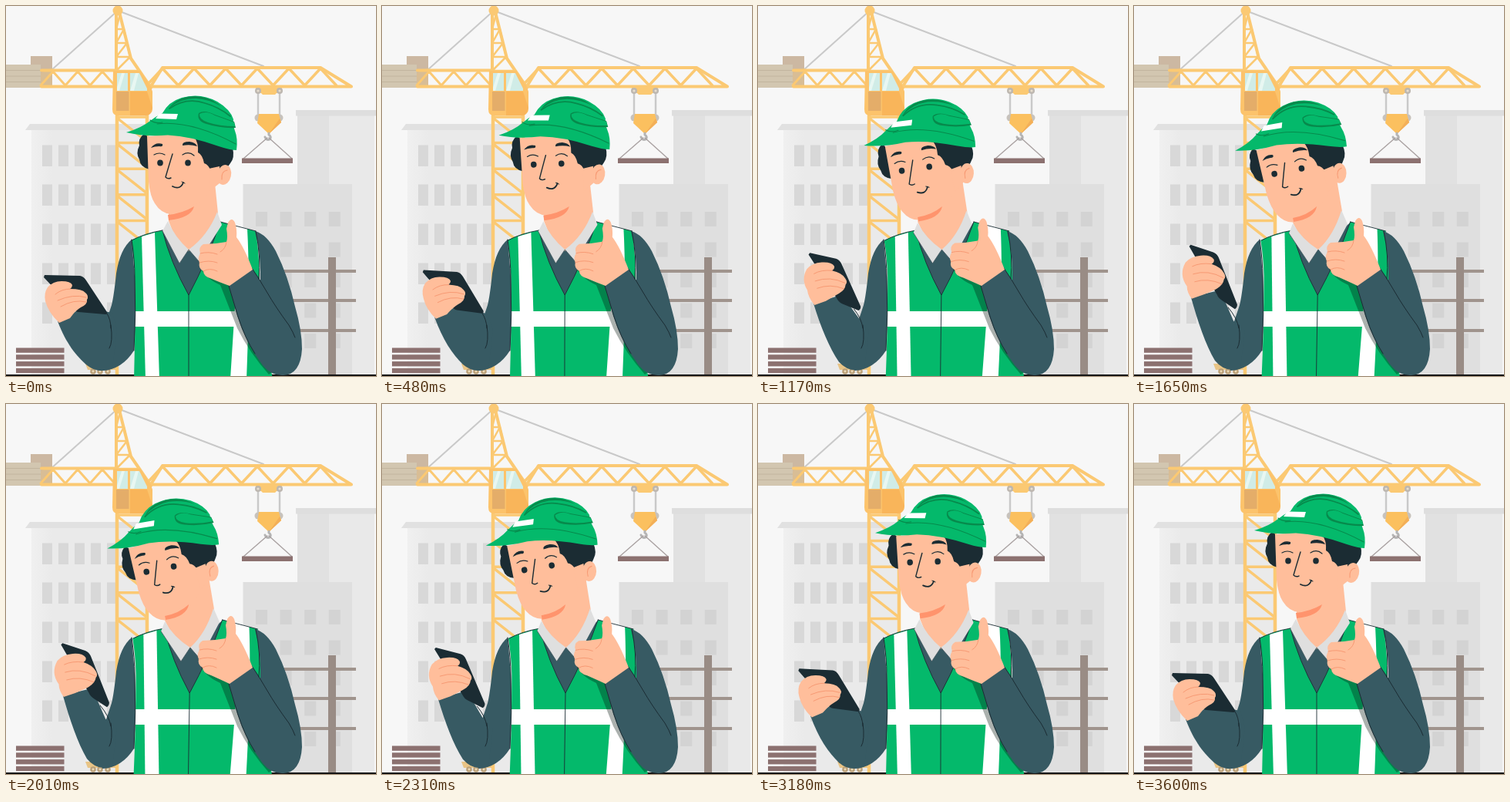
Animation of 480x480 px, one loop 3630 ms. Source, as an HTML page with a canvas:

```html
<!DOCTYPE html>
<html lang="en">
<head>
<meta charset="utf-8">
<title>Site engineer</title>
<style>
html, body { margin: 0; width: 100%; height: 100%; overflow: hidden; background: #f7f7f7; }
canvas { display: block; width: 480px; height: 480px; }
</style>
</head>
<body>
<canvas id="stage" width="480" height="480"></canvas>
<script>
const ctx = document.getElementById('stage').getContext('2d');
const LOOP = 3630;
const GREEN = '#04b96b', DEEP = '#078a4c', INK = '#1b2c33', SLEEVE = '#375a63';
const SKIN = '#ffbe9b', SKIN_LINE = '#f79a74', YELLOW = '#fbc973', STEEL = '#c9c9c9', BROWN = '#8c7170';

const fill = (color, path) => { ctx.fillStyle = color; ctx.fill(new Path2D(path)); };
const line = (color, width, path) => {
  ctx.strokeStyle = color;
  ctx.lineWidth = width;
  ctx.stroke(new Path2D(path));
};
const box = (color, x, y, w, h) => { ctx.fillStyle = color; ctx.fillRect(x, y, w, h); };
const dot = (color, x, y, rx, ry = rx, turn = 0) => {
  ctx.fillStyle = color;
  ctx.beginPath();
  ctx.ellipse(x, y, rx, ry, turn, 0, Math.PI * 2);
  ctx.fill();
};
// Blends two path strings that share the same commands.
const morph = (from, to, k) => {
  const ends = to.match(/-?[\d.]+/g);
  let i = 0;
  return from.replace(/-?[\d.]+/g, n => +n + (ends[i++] - n) * k);
};
const zigzag = (x0, x1, step, low, high) => {
  let path = `M${x0} ${low}`;
  for (let x = x0 + step, up = true; x <= x1; x += step, up = !up) path += `L${x} ${up ? high : low}`;
  return path;
};

function buildings() {
  box('#f7f7f7', 0, 0, 480, 480);
  const shade = ctx.createLinearGradient(32, 0, 60, 0);
  shade.addColorStop(0, '#f0f0f0');
  shade.addColorStop(1, '#eaeaea');
  ctx.fillStyle = shade;
  ctx.fillRect(33, 160, 150, 319);
  fill('#e1e1e1', 'M25 161L31 153H185V161Z');
  for (let r = 0; r < 5; r++)
    for (let c = 0; c < 5; c++) box('#d8d8d8', 47 + c * 21, 180.5 + r * 51, 13, 27.5);

  box('#e9e9e9', 378, 142, 100, 337);
  box('#e1e1e1', 378, 142, 41, 100);
  box('#dedede', 376, 135, 104, 7.5);
  box('#dfdfdf', 307.5, 231, 141.5, 248);
  for (let r = 0; r < 5; r++)
    for (let c = 0; c < 4; c++) box('#d3d3d3', 324 + c * 31.6, 267 + r * 39.5, 15, 19);

  for (const y of [342, 380, 419]) box('#a0948d', 340, y, 114, 4);
  box('#998c85', 418, 326, 10, 153);
  for (let i = 0; i < 4; i++) box(BROWN, 13, 443.5 + i * 8.8, 62.5, 6.3);
}

function crane() {
  line(STEEL, 2, 'M145 6L58 84M145 6L334 78');
  box('#ccb8a2', 32, 65, 28, 31);
  box('#d2c6b0', 0, 76, 45, 30);
  line('#c2b59e', 1, 'M0 83.5H45M0 91H45M0 98.5H45');
  fill('#d8bd95', 'M45 87L60 80V104H45Z');

  line(YELLOW, 4, 'M46 83.5H142M46 104.5H142');
  line(YELLOW, 3, zigzag(45, 142, 16, 103, 85));
  line(YELLOW, 4, 'M187 104.5H448L408 80H203L188 104');
  line(YELLOW, 3.5, zigzag(182.5, 430, 20.5, 103, 81));

  line(YELLOW, 4.5, 'M144 142V479M183 140V479');
  for (let y = 144; y < 310; y += 33.6) line(YELLOW, 3.5, `M144 ${y}H183M145 ${y + 2}L183 ${y + 32}`);
  line(YELLOW, 4, 'M143 8V88M147 8L154 36L162 68L188 106');
  line(YELLOW, 2.5, 'M143 30H153L143 48H157L143 66H161L143 84H172M147 14L143 30M153 30L157 48L161 66');
  dot(YELLOW, 145, 6, 6.5);

  fill('#fcc36b', 'M139 84H174L188 105L190 111V133Q190 141 181 142H145Q138 142 138 134Z');
  fill('#d0ece7', 'M144 87H158V110H144ZM161 87H173L183 107V110H161Z');
  fill('#e8f7f2', 'M150 87H154L147 110H144V106ZM168 87H172L166 110H161Z');
  box('#e4ad69', 143, 111, 16.5, 25);
  fill('#f9b55a', 'M161 111H183L190 132Q189 142 181 142H161Z');

  line(STEEL, 2.5, 'M327 112V143M355 112V143');
  fill(YELLOW, 'M324 106H358V113H351L349 115H333L331 113H324Z');
  for (const x of [327, 355]) {
    dot('#bdb7b0', x, 110, 4);
    dot('#e9dfcf', x, 110, 1.6);
    dot('#c7c2bc', x, 145, 4.5);
  }
  fill('#fbc05f', 'M328 140H354L357 151L341 166L326 152Z');
  fill('#f3af58', 'M341 166L357 151L355 146Z');
  line('#b4b4b4', 3, 'M341 165V167Q345 170 342 173Q338 175 336 170');
  line('#aaa2a2', 1.4, 'M339 171L308 198M341 171L371 198');
  box(BROWN, 306, 197.5, 66, 6.5);

  fill('#e8c486', 'M103 464H142V472H106Z');
  for (const x of [113, 122, 132]) {
    dot('#bca179', x, 474, 3.8);
    dot('#eddbb8', x, 474, 1.4);
  }
  box('#161616', 0, 478, 480, 2);
}

function neck(k) {
  fill(SKIN, morph('M211 255L211 279L220 302L237 318L262 300L275 269L270 220Z',
    'M206 258L206 281L217 302L237 318L260 298L270 267L262 220Z', k));
}

function chinShadow(k) {
  fill('#ff946d', morph('M210 271Q229 269 244 260Q240 275 211 278Z', 'M206 275Q224 272 237 260Q234 276 207 280Z', k));
}

function collar(k) {
  fill('#dfdfdf', morph('M210 279L203 292L225 334L237 316Q219 300 210 279Z',
    'M206 282L201 295L227 334L239 316Q217 302 206 282Z', k));
  fill('#dfdfdf', morph('M274 267L280 284L250 331L237 316Q262 298 274 267Z',
    'M269 265L277 283L252 331L239 316Q259 298 269 265Z', k));
  line('#42565d', .8, morph('M203 292L225 334L237 316L250 331', 'M201 295L227 334L239 316L252 331', k));
}

function torso(k) {
  const lean = k * .016;
  ctx.save();
  ctx.transform(1, 0, -lean, 1, lean * 450, 0);
  fill(SLEEVE, 'M203 291L237 316L279 280L285 350L237 380L205 320Z');
  fill(GREEN, 'M162 304Q180 295 203 291Q213 332 237 375Q262 328 278 280L324 292Q330 330 329 390L346 484H166Q168 420 167 350Q166 325 162 304Z');
  fill('#fff', 'M176 299L193 294L199 484H181Z');
  fill('#fff', 'M167 396H308V416H167Z');
  fill('#fff', 'M294 283L313 289Q317 360 312 484H291L297 390Z');
  line(INK, .9, 'M203 291Q213 332 237 375Q262 328 278 280M237 375V484M163 304Q180 295 203 291M278 280L324 292');
  ctx.restore();
}

function phoneArm(k) {
  fill(SLEEVE, 'M163 303Q148 315 143 347Q140 376 137 388L129 412L116 440L125 473Q150 472 166 447Q169 400 167 350Z');
  fill(SLEEVE, morph('M67 409C78 438 91 454 105 466Q120 478 138 470L144 420L138 398L100 391Z',
    'M74 377C83 409 93 439 105 460Q119 477 138 470L144 420L129 409L112 368Z', k));
  line(INK, 1, 'M163 303Q167 330 167 352Q169 400 166 447M136 414Q139 436 134 444');
  line(INK, 1, morph('M131 399Q136 407 136 418', 'M122 391Q134 405 136 418', k));
  fill(INK, morph('M50 349L96 350Q101 351 104 356L131 397Q132 400 129 400L94 397Q90 397 86 391L49 352Z',
    'M74 309L103 319Q108 321 110 326L134 387Q134 391 131 393L115 382Q110 379 108 374L72 311Z', k));
  fill(SKIN, morph(
    'M54 365Q61 357 72 357Q84 357 86 362Q86 365 83 367Q99 367 103 372Q108 376 105 381Q106 387 97 391Q90 395 83 405L69 411Q55 398 51 383Q49 372 54 365Z',
    'M67 332Q74 324 87 323Q100 322 104 328Q105 332 101 334Q113 338 117 346Q120 351 117 354Q116 361 108 366Q103 369 90 374L75 379Q69 371 69 363Q58 348 67 332Z', k));
  line(SKIN_LINE, 1, morph('M84 367Q72 367 64 374M104 378Q87 373 67 382M104 384Q88 380 71 390',
    'M101 334Q86 332 76 337M116 352Q96 341 77 347M114 360Q96 352 79 357', k));
}

function thumbArm(k) {
  fill('rgba(0,20,10,.33)', 'M251 336Q256 352 278 362L300 418Q316 450 341 478L352 470L296 352Z');
  fill(SLEEVE, 'M323 292Q338 296 350 318Q366 350 375 390Q384 421 384 445Q382 478 360 479Q344 480 333 466Q311 437 300 402L289 363L319 340L330 356Q331 320 323 292Z');
  line(INK, 1, 'M324 292Q331 325 328 354M319 340Q328 353 339 372Q350 391 367 414Q373 424 375 430M289 363L301 403Q310 431 323 451');
  ctx.save();
  ctx.translate(-k, -2 * k);
  fill(SKIN, `M288 281Q293 273 297 281Q300 290 299 300Q309 313 ${320 + k} ${342 + 2 * k}L${290 + k} ${363 + 2 * k}Q276 358 267 354Q256 351 256 344Q249 340 251 333Q248 327 252 321Q249 313 256 309Q271 309 286 306Q288 300 286 289Z`);
  line(SKIN_LINE, 1, 'M252 321Q263 318 274 322M251 333Q263 329 274 333M256 344Q264 339 274 344M286 306Q285 315 278 319');
  ctx.restore();
}

function head(k) {
  ctx.save();
  ctx.translate(272 - 2 * k, 292 - 1.5 * k);
  ctx.rotate(-.201 * k);
  ctx.translate(-272, -292);

  fill(INK, 'M179 166Q171 172 173 181Q168 191 173 199Q174 209 186 212L200 180Z');
  fill(SKIN, 'M183 169L185 228Q187 247 193 256Q201 269 214 270Q242 265 260 246L276 229L280 180L250 164Z');
  fill(INK, 'M244 170Q250 177 249 190Q255 193 257 204Q263 206 265 213Q284 217 291 204Q297 197 294 184L270 170Z');
  dot(SKIN, 283, 219, 9, 13, .2);
  fill(SKIN, 'M263 211L277 208V230L264 240Z');
  line(SKIN_LINE, 1.1, 'M287 213Q279 214 280 225');

  fill(INK, 'M188 184Q194 176 203 179Q204 183 199 182Q193 182 188 184ZM229 181Q228 176 238 176Q246 177 248 182Q239 179 229 181Z');
  line(INK, 1.2, 'M192 193Q199 189 206 193M229 193Q237 188 244 194');
  dot(INK, 200, 203.5, 3.8, 4);
  dot(INK, 236, 203.5, 3.8, 4);
  line(INK, 1.4, 'M216 192Q212 205 207 222Q210 225 214 223');
  line(INK, 1.8, 'M216 234Q226 239 230 229');
  line(INK, 1, 'M228 228L232 230');

  fill(GREEN, 'M156 164Q176 158 187 149Q195 143 203 139Q211 124 228 119Q252 112 274 124Q291 134 295 147Q294 154 297 162Q301 172 299 187Q291 187 276 182Q240 169 210 167.5Q181 170 156 164Z');
  line(DEEP, 1.1, 'M196 153Q240 148 298 179M187 148Q193 153 203 151');
  fill(DEEP, 'M212 132Q226 120 246 120Q264 121 279 130Q264 117 243 117Q222 118 212 132Z');
  line(DEEP, 1.8, 'M212 133Q234 118 258 126Q276 131 291 143');
  fill(DEEP, 'M250 139Q257 134 271 141L296 150L298 158Q279 159 260 153Q247 149 250 139Z');
  fill(GREEN, 'M251 140Q260 135 271 142L296 151L297 156Q277 156 262 151Q250 147 251 140Z');
  fill('#fff', 'M199 139.5L223 140L221 147L194 146Z');
  ctx.restore();
}

function draw(now) {
  const k = (1 - Math.cos(now / LOOP * Math.PI * 2)) / 2;
  ctx.lineJoin = ctx.lineCap = 'round';
  buildings();
  crane();
  torso(k);
  neck(k);
  collar(k);
  phoneArm(k);
  thumbArm(k);
  head(k);
  chinShadow(k);
}

const start = performance.now();
function tick() {
  draw((performance.now() - start) % LOOP);
  requestAnimationFrame(tick);
}
tick();
</script>
</body>
</html>
```
